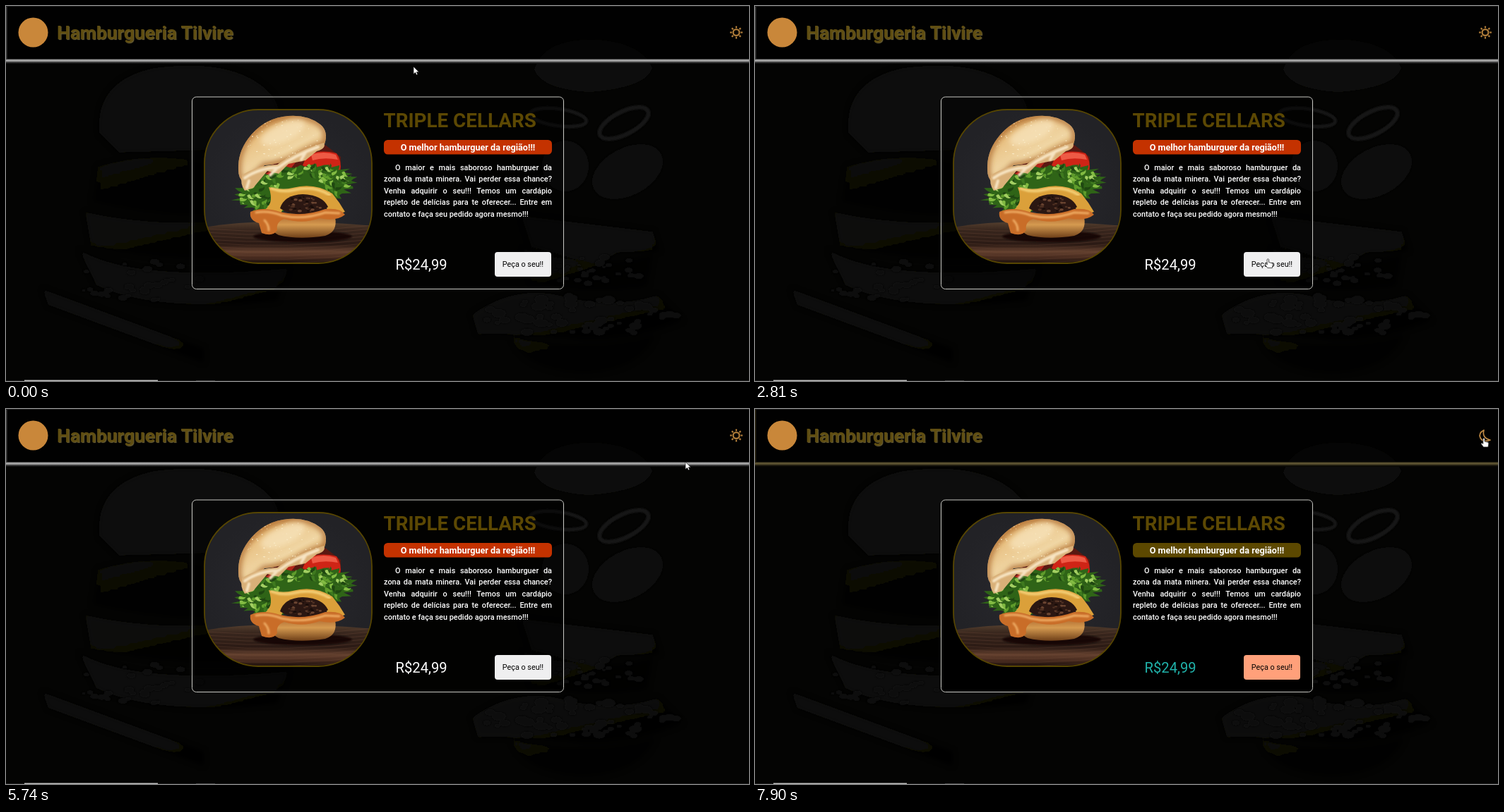
Recreate the animation shown at these times as an HTML page. Size 1052 by 532 pixels, loop 8 s.

```html
<!DOCTYPE html>
<html lang="pt-BR">
<head>
<meta charset="utf-8">
<title>Hamburgueria</title>
<style>
html, body { margin: 0; width: 100%; height: 100%; overflow: hidden; background: #040403; }
svg { display: block; width: 1052px; height: 532px; }
svg, p { font-family: Roboto, "Noto Sans", sans-serif; }
p { margin: 0; color: #fff; font-size: 10.9px; font-weight: 500; line-height: 16.5px; }
p span { display: block; white-space: nowrap; text-align: justify; text-align-last: justify; }
p span:first-child { padding-left: 16px; }
p span:last-child { text-align-last: left; }
.brand { font-weight: 700; font-size: 26.4px; fill: #604e12; text-shadow: 1px 1px 1px #6d6238; }
</style>
</head>
<body>
<svg viewBox="0 0 1052 532">
  <defs>
    <linearGradient id="bun" x1=".1" y1=".1" x2=".75" y2="1">
      <stop offset="0" stop-color="#c98a3f"/><stop offset=".25" stop-color="#e9c285"/>
      <stop offset=".55" stop-color="#f0d6a4"/><stop offset=".85" stop-color="#d9a35a"/>
      <stop offset="1" stop-color="#a8642a"/>
    </linearGradient>
    <linearGradient id="base" x1="0" y1="0" x2="0" y2="1">
      <stop offset="0" stop-color="#a8612a"/><stop offset=".45" stop-color="#d59a50"/>
      <stop offset="1" stop-color="#6f4019"/>
    </linearGradient>
    <linearGradient id="wood" x1="0" y1="0" x2="0" y2="1">
      <stop offset="0" stop-color="#55402f"/><stop offset=".2" stop-color="#38261d"/>
      <stop offset=".55" stop-color="#2b1a14"/><stop offset=".72" stop-color="#63402e"/>
      <stop offset=".86" stop-color="#472a1e"/><stop offset="1" stop-color="#170d0a"/>
    </linearGradient>
    <radialGradient id="wall">
      <stop offset="0" stop-color="#29292e"/><stop offset="1" stop-color="#222226"/>
    </radialGradient>
    <linearGradient id="haze" x1="0" y1="0" x2="1" y2="1">
      <stop offset="0" stop-color="#0d0d0c"/><stop offset="1" stop-color="#050505"/>
    </linearGradient>
    <linearGradient id="glow" x1="0" y1="0" x2="0" y2="1">
      <stop offset="0" stop-opacity=".8"/><stop offset=".25" stop-opacity="0"/>
      <stop offset=".45" stop-opacity=".08"/><stop offset=".65" stop-opacity=".6"/>
      <stop offset="1" stop-opacity="1"/>
    </linearGradient>
    <filter id="soft"><feGaussianBlur stdDeviation="3.5"/></filter>
    <filter id="blur"><feGaussianBlur stdDeviation=".8"/></filter>
    <clipPath id="frame"><rect x="281" y="147" width="237" height="218" rx="76"/></clipPath>
    <path id="crown" d="M329 232Q328 208 343 188Q362 162 392 157Q424 152 445 168Q457 178 451 196Q430 201 408 215Q390 224 366 226Q352 240 336 250Q329 244 329 232Z"/>
    <clipPath id="crownClip"><use href="#crown"/></clipPath>
  </defs>

  <rect width="1052" height="532" fill="#040403"/>

  <!-- dim backdrop -->
  <g filter="url(#soft)" fill="url(#haze)">
    <path d="M132 180Q126 106 210 88Q330 72 378 128Q398 160 388 202L160 208Z"/>
    <path d="M130 228Q200 205 290 222T400 226L404 290Q260 312 122 278Z" opacity=".6"/>
    <path d="M112 292Q230 320 410 296L396 350Q260 372 120 340Z" opacity=".7"/>
    <path d="M104 346Q180 392 400 372L384 418Q210 436 128 396Z"/>
    <path d="M52 402L280 486V506L60 424Z"/>
    <path d="M730 298L916 320L925 348L866 350L838 366L744 342Z"/>
    <path d="M732 344Q830 378 916 352L908 398Q820 412 744 392Z" opacity=".7"/>
    <path d="M660 438Q720 394 790 412T922 410L958 446Q880 480 800 472T668 466Z" opacity=".8"/>
    <path d="M716 470Q820 492 920 466Q900 518 816 522Q730 516 716 470Z" opacity=".6"/>
  </g>
  <path d="M748 90Q762 44 840 48Q902 54 915 88Q906 116 826 122Q758 118 748 90Z" fill="#0e0e0d" filter="url(#blur)"/>
  <g id="specks" fill="#101010" filter="url(#blur)"/>
  <g fill="none" stroke="#181818" filter="url(#blur)">
    <ellipse cx="875" cy="166" rx="38" ry="16" stroke-width="6" transform="rotate(-27 875 166)"/>
    <ellipse cx="782" cy="158" rx="40" ry="12" stroke-width="5" transform="rotate(8 782 158)"/>
    <ellipse cx="880" cy="235" rx="52" ry="32" stroke="#101010" fill="#090909" stroke-width="3" transform="rotate(-28 880 235)"/>
    <ellipse cx="792" cy="227" rx="32" ry="35" stroke="#0e0e0e" fill="#090909" stroke-width="2"/>
  </g>

  <!-- header -->
  <rect width="1052" height="77" fill="#000" fill-opacity=".6"/>
  <rect width="1052" height="1" fill="#1c1c1c"/>
  <rect id="edge" y="1" width="1.5" height="78"/>
  <rect id="rule" y="75" width="1052" height="7"/>
  <rect y="75" width="1052" height="7" fill="url(#glow)"/>
  <circle cx="38.5" cy="37.5" r="21" fill="#c9873a"/>
  <text class="brand" x="72" y="47">Hamburgueria Tilvire</text>
  <g id="sun" fill="none" stroke="#b07d3a" stroke-width="2.2"><circle cx="1034" cy="37.5" r="4.4"/></g>
  <path id="moon" d="M1032 30Q1024 34 1027 41Q1031 48 1041 44Q1029 41 1032 30Z"
    fill="none" stroke="#c08a45" stroke-width="1.7" stroke-linejoin="round"/>

  <!-- card -->
  <rect id="card" x="263.5" y="129" width="526" height="272.5" rx="6" stroke="#c9c9c4"/>
  <g clip-path="url(#frame)">
    <rect x="281" y="147" width="237" height="218" fill="url(#wall)"/>
    <path d="M281 314Q330 305 400 306T518 312V365H281Z" fill="url(#wood)"/>
    <g id="grain" fill="none" stroke="#7a5440" stroke-opacity=".3"/>
    <ellipse cx="420" cy="327" rx="70" ry="8" fill="#0d0705" fill-opacity=".8" filter="url(#blur)"/>
    <path d="M370 300Q420 290 466 300Q470 320 452 326Q414 332 386 325Q372 318 370 300Z" fill="url(#base)"/>

    <path d="M338 242L372 228L400 206L448 194L474 214V236L440 250L350 264Z" fill="#5a1912"/>
    <path d="M426 212Q444 203 468 209Q476 220 473 235Q444 240 420 226Z" fill="#cf2416"/>
    <path d="M432 211Q450 205 467 211L470 218Q450 214 434 219Z" fill="#ee5a45"/>
    <path d="M352 252Q376 226 410 222L396 240L366 258Z" fill="#b5261a"/>
    <path id="leaf" fill="#2f6417"/>
    <g id="frills"/>

    <path d="M372 257Q392 262 406 258Q436 250 462 266Q472 278 480 292L462 298L446 276Q420 266 398 276L388 296Q372 300 360 292Q382 284 372 257Z" fill="#dba03a"/>
    <path d="M376 259Q392 265 408 261Q436 254 458 268" fill="none" stroke="#f3cc72" stroke-width="4" stroke-linecap="round" filter="url(#blur)"/>
    <path d="M388 287Q394 268 420 267Q448 268 456 285Q444 296 420 296Q398 295 388 287Z" fill="#2b1712"/>
    <g id="crumbs"/>
    <path d="M346 292Q364 284 388 292Q420 300 452 288Q474 286 480 296Q468 306 444 301Q420 310 394 302Q382 306 384 318Q378 328 362 322L358 308Q344 304 346 292Z" fill="#c96d28"/>
    <path d="M354 293Q372 290 390 297Q420 304 452 293L472 294M366 304Q372 310 372 318" fill="none" stroke="#eeaa62" stroke-width="3" stroke-linecap="round" filter="url(#blur)"/>

    <use href="#crown" fill="url(#bun)"/>
    <g clip-path="url(#crownClip)">
      <use href="#crown" fill="none" stroke="#a9662a" stroke-opacity=".7" stroke-width="9" filter="url(#soft)"/>
      <ellipse cx="392" cy="180" rx="34" ry="13" fill="#f8e6bf" fill-opacity=".7" transform="rotate(-24 392 180)" filter="url(#soft)"/>
      <g id="seeds" fill="#fbeecb"/>
    </g>
    <path d="M334 240Q356 226 384 225Q408 207 450 194Q454 202 440 206L424 219L400 224L386 238L370 234L350 258L338 262Q331 252 334 240Z" fill="#d9b078"/>
    <path d="M338 244Q358 230 386 229Q408 212 442 200M344 248L341 258M384 230L374 240M424 208L418 218" fill="none" stroke="#f7e4c2" stroke-width="4" stroke-linecap="round" filter="url(#blur)"/>
  </g>
  <rect x="281" y="147" width="237" height="218" rx="76" fill="none" stroke="#574600" stroke-width="1.8"/>
  <text x="534.5" y="172" font-size="27.8" font-weight="700" fill="#5c4803">TRIPLE CELLARS</text>
  <rect id="banner" x="535" y="190" width="238" height="20.5" rx="5.5"/>
  <text x="654" y="204.5" font-size="12.65" font-weight="700" fill="#fff" text-anchor="middle">O melhor hamburguer da região!!!</text>
  <foreignObject x="535" y="221.5" width="238" height="90">
    <p xmlns="http://www.w3.org/1999/xhtml"><span>O maior e mais saboroso hamburguer da</span><span>zona da mata minera. Vai perder essa chance?</span><span>Venha adquirir o seu!!! Temos um cardápio</span><span>repleto de delícias para te oferecer... Entre em</span><span>contato e faça seu pedido agora mesmo!!!</span></p>
  </foreignObject>
  <text id="price" x="551.5" y="374" font-size="20.2">R$24,99</text>
  <rect id="button" x="692" y="349" width="80" height="35" rx="4"/>
  <text x="732" y="370" font-size="10.8" text-anchor="middle">Peça o seu!!</text>

  <rect y="531" width="1052" height="1" fill="#1c1c1c"/>
  <rect x="26" y="530.6" width="189" height="1.4" fill="#c4c4c4"/>
  <rect x="269" y="531" width="27" height="1" fill="#444"/>

  <g id="lens">
    <circle cx="480" cy="178" r="9" fill="#8a9bb0"/>
    <g fill="none" stroke="#33506f">
      <rect x="475.5" y="173.5" width="9" height="9" rx="2.5" stroke-dasharray="4 4"/>
      <circle cx="480" cy="178" r="1.7"/>
    </g>
  </g>
  <circle id="press" cx="1028" cy="42.5" r="5" fill="#d8413c" fill-opacity=".75"/>
  <path id="arrow" d="M0 0V10.5L2.5 8.3L4.1 11.8L5.8 11L4.3 7.7H7.6Z" fill="#fff" stroke="#111" stroke-width=".6"/>
  <path id="hand" d="M-1.2 1Q0 -.8 1.2 1V5L5.6 6.1Q7 6.6 6.8 8.5L6 13H-.6L-3.8 8.6Q-4.2 6.9 -2.6 7.2L-1.2 8.4Z" fill="#fff" stroke="#222" stroke-width=".8"/>
</svg>
<script>
const LOOP = 8000;
const $ = id => document.getElementById(id);
const set = (id, attrs) => { for (const k in attrs) $(id).setAttribute(k, attrs[k]); };
const show = (id, on) => set(id, { visibility: on ? 'visible' : 'hidden' });
const clamp = v => Math.max(0, Math.min(1, v));
const smooth = v => v * v * (3 - 2 * v);
const lerp = (a, b, k) => a + (b - a) * k;
const mix = (a, b, k) => `rgb(${a.map((v, i) => Math.round(lerp(v, b[i], k)))})`;

function add(parent, tag, attrs) {
  const el = document.createElementNS('http://www.w3.org/2000/svg', tag);
  for (const k in attrs) el.setAttribute(k, attrs[k]);
  $(parent).append(el);
}

let seed = 11;
const rand = () => (seed = seed * 16807 % 2147483647) / 2147483647;

// small random dots inside an ellipse
function scatter(parent, count, cx, cy, rx, ry, size, colors) {
  for (let i = 0; i < count; i++) {
    const a = rand() * 6.28, r = Math.sqrt(rand()), s = size * (0.5 + rand());
    const dot = { cx: cx + rx * r * Math.cos(a), cy: cy + ry * r * Math.sin(a), rx: s, ry: s * 0.6 };
    if (colors) dot.fill = colors[i % colors.length];
    add(parent, 'ellipse', dot);
  }
}

// sun rays
for (let i = 0; i < 8; i++)
  add('sun', 'path', { d: 'M1034 31.3V28.6', transform: `rotate(${i * 45} 1034 37.5)` });

// ruffled lettuce
const leafAt = (a, r) => [410 + 82 * r * Math.cos(a), 259 - 11 * Math.cos(a) + 31 * r * Math.sin(a)];
const rim = [];
for (let i = 0; i < 76; i++) {
  const r = 1 + 0.1 * Math.sin(i * 2.3) + 0.08 * (rand() - 0.5);
  rim.push(leafAt(i / 76 * Math.PI * 2, r).map(v => v.toFixed(1)));
}
set('leaf', { d: 'M' + rim.join('L') + 'Z' });
const greens = ['#5f9c2b', '#1f4711', '#82bb42', '#3f7a1f', '#a3cf62', '#2c5c17'];
for (let i = 0; i < 130; i++) {
  const [x, y] = leafAt(rand() * 6.28, 0.45 + 0.52 * rand());
  add('frills', 'path', {
    d: `M${x - 5} ${y}q2 -5 5 -2t6 2q-4 5 -11 0`,
    fill: greens[i % 6], transform: `rotate(${(rand() * 160 - 80).toFixed()} ${x} ${y})`
  });
}
for (let i = 0; i < 10; i++)
  add('grain', 'path', { d: `M281 ${316 + i * 5}Q400 ${325 + i * 5} 518 ${311 + i * 5}` });
scatter('crumbs', 40, 421, 282, 27, 11, 2, ['#4f3022', '#180c09', '#6b4531']);
scatter('seeds', 70, 390, 190, 55, 32, 0.8);
scatter('specks', 60, 810, 440, 140, 30, 7);
scatter('specks', 35, 830, 375, 80, 20, 5);
scatter('specks', 30, 190, 390, 90, 30, 5);

// pointer stops: time, x, y
const stops = [
  [0, 577, 86], [40, 577, 86], [820, 368, 58], [860, 368, 58], [1550, 206, 46], [1770, 206, 46],
  [2160, 535, 195], [2550, 546, 197], [2590, 546, 197], [2850, 738, 369], [3020, 738, 369],
  [3150, 726, 370], [3760, 726, 370], [4150, 798, 300], [4530, 796, 236], [4580, 796, 236],
  [4880, 674, 262], [5350, 916, 104], [5400, 916, 104], [5440, 962, 75], [5740, 962, 75],
  [6000, 1001, 63], [6170, 1001, 63], [6520, 1030, 41], [7380, 1030, 41], [7470, 1032, 41], [LOOP, 1032, 41]
];
const textAreas = [[60, 20, 390, 62], [536, 150, 773, 176], [536, 222, 773, 304]];
const links = [[692, 349, 772, 384], [1022, 26, 1046, 50]];
const inside = (boxes, x, y) => boxes.some(b => x >= b[0] && y >= b[1] && x <= b[2] && y <= b[3]);

function pointer(t) {
  const i = stops.findIndex(s => s[0] > t);
  const [t0, x0, y0] = stops[i - 1], [t1, x1, y1] = stops[i];
  const k = smooth((t - t0) / (t1 - t0));
  return [lerp(x0, x1, k), lerp(y0, y1, k)];
}

function draw(t) {
  const [x, y] = pointer(t);
  const link = inside(links, x, y);
  const place = { transform: `translate(${x.toFixed(1)} ${y.toFixed(1)})` };
  set('arrow', place);
  set('hand', place);
  show('hand', link);
  show('arrow', !link && !inside(textAreas, x, y));
  show('lens', t >= 1970 && t < 2400);
  show('press', t >= 6770 && t < 6990);

  const k = smooth(clamp((t - 6960) / 200));
  show('sun', k < 0.5);
  show('moon', k >= 0.5);
  set('card', { fill: '#000', 'fill-opacity': lerp(0.45, 1, k) });
  set('rule', { fill: mix([176, 176, 176], [98, 88, 52], k) });
  set('edge', { fill: mix([66, 66, 66], [44, 38, 18], k) });
  set('banner', { fill: mix([196, 50, 0], [92, 72, 0], k) });
  set('price', { fill: mix([255, 255, 255], [32, 178, 170], k) });
  set('button', { fill: mix([239, 239, 240], [255, 160, 122], k) });
}

function tick(now) {
  draw(now % LOOP);
  requestAnimationFrame(tick);
}
draw(0);
requestAnimationFrame(tick);
</script>
</body>
</html>
```
